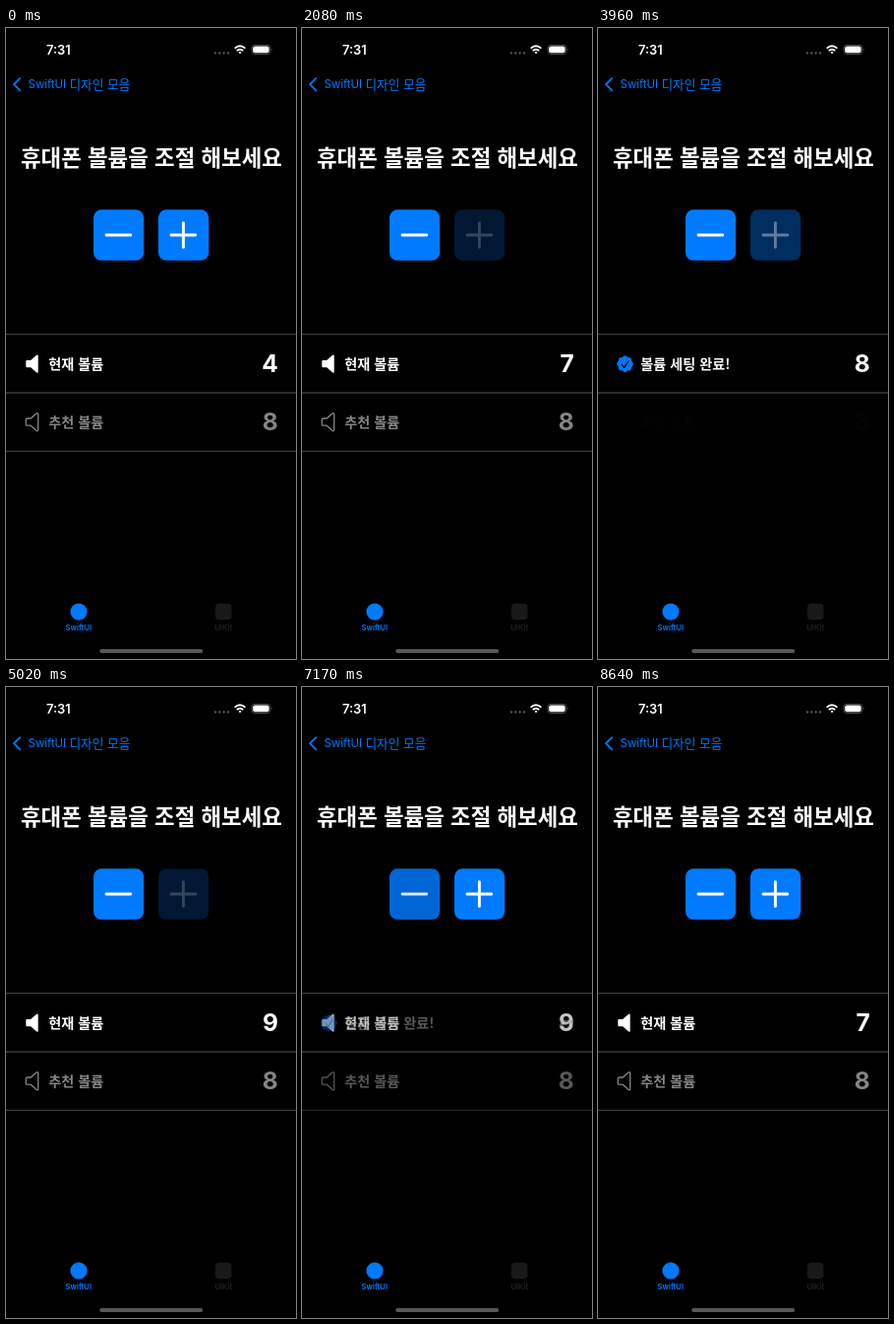
These frames come from a looping animation (295 by 640 pixels, 9.37 s). An HTML page:

```html
<!DOCTYPE html>
<html lang="ko">
<head>
<meta charset="utf-8">
<title>볼륨 조절</title>
<style>
  html, body { margin: 0; width: 100%; height: 100%; overflow: hidden; background: #000; }
  svg { display: block; width: 295px; height: 640px; }
  text { font-family: Inter, "Noto Sans CJK KR", "Noto Sans CJK JP", "Noto Sans CJK", sans-serif; fill: #fff; }
  .ko { font-family: "Noto Sans CJK KR", "Noto Sans CJK JP", "Noto Sans CJK", sans-serif; }
  .label { font-size: 14.15px; font-weight: 700; }
  .number { font-size: 24.5px; font-weight: 700; text-anchor: end; }
  .tab { font-size: 7.7px; font-weight: 600; text-anchor: middle; }
  .blue { fill: #007aff; }
  .gray { fill: #848484; }
  .line { stroke: #3b3b3b; stroke-width: 1.4; }
  .sign { fill: none; stroke: #fff; stroke-width: 2.9; stroke-linecap: round; }
</style>
</head>
<body>
<svg viewBox="0 0 295 640">
  <defs>
    <path id="speaker" d="M21.2 337h4l5.6-5q1.9-1.2 1.9.8v15.6q0 2-1.9.8l-5.6-5h-4q-.9 0-.9-.9v-5.4q0-.9.9-.9z"/>
  </defs>
  <rect width="295" height="640"/>

  <text x="41" y="26.6" font-size="12.9" font-weight="600">7:31</text>
  <path d="M213 25.4h13" stroke="#555" stroke-width="2.4" stroke-linecap="round" stroke-dasharray="0 4.3"/>
  <g fill="none" stroke="#fff" stroke-width="1.9">
    <path d="M232.6 20.6q5.4-4.8 10.8 0M234.8 23q3.2-2.7 6.4 0"/>
    <path d="M236.4 24.6q1.6-1.2 3.2 0l-1.6 1.8z" fill="#fff" stroke="none"/>
  </g>
  <rect x="250" y="17.4" width="18.8" height="9" rx="2.9" fill="none" stroke="#666" stroke-width=".8"/>
  <rect x="251.2" y="18.6" width="16.4" height="6.6" rx="1.9" fill="#fff"/>
  <path d="M269.9 20.5q1.3 1.4 0 2.8z" fill="#777"/>

  <path d="M14.2 51.2L8 57.2l6.2 6.1" fill="none" stroke="#007aff" stroke-width="1.8" stroke-linecap="round" stroke-linejoin="round"/>
  <text class="blue" x="22.6" y="61.3" font-size="11.4">SwiftUI</text>
  <text class="blue ko" x="64.4" y="61.5" font-size="12.7">디자인 모음</text>

  <text class="ko" x="15" y="140.4" font-size="22.38" font-weight="700">휴대폰 볼륨을 조절 해보세요</text>

  <g id="minus">
    <rect class="blue" x="89" y="184.3" width="51.2" height="51.5" rx="8"/>
    <path class="sign" d="M102 210h24.8"/>
  </g>
  <g id="plus">
    <rect class="blue" x="155" y="184.3" width="51.2" height="51.5" rx="8"/>
    <path class="sign" d="M168 210h24.8M180.4 197.6v24.8"/>
  </g>

  <path class="line" d="M0 310.6h295M0 370h295"/>
  <g id="current">
    <use href="#speaker" fill="#fff"/>
    <text class="label ko" x="43.3" y="345.5">현재 볼륨</text>
    <text class="number" id="value" x="276.8" y="349.3"></text>
  </g>
  <g id="done">
    <path id="seal" class="blue"/>
    <path d="M24.2 341.4l2.5 3 4.2-6.5" fill="none" stroke="#000" stroke-width="1.4" stroke-linecap="round" stroke-linejoin="round"/>
    <text class="label ko" x="43.3" y="345.5">볼륨 세팅 완료!</text>
    <text class="number" x="276.8" y="349.3">8</text>
  </g>
  <g id="advice">
    <use href="#speaker" y="59" fill="none" stroke="#848484" stroke-width="1.3"/>
    <text class="label ko gray" x="43.3" y="404.5">추천 볼륨</text>
    <text class="number gray" x="276.8" y="408.3">8</text>
    <path class="line" d="M0 429.4h295"/>
  </g>

  <circle class="blue" cx="74" cy="592" r="8.6"/>
  <text class="tab blue" x="73.8" y="611.2">SwiftUI</text>
  <rect x="213" y="583.8" width="16.4" height="16.4" rx="4" fill="#191919"/>
  <text class="tab" x="221.2" y="611.2" style="fill:#202020">UIKit</text>
  <rect x="95.2" y="630" width="105" height="4" rx="2" fill="#575757"/>
</svg>
<script>
  const LOOP = 9370, STEP = 109, HOLD = 80, UNDIM = 250, FADE = 350;
  const START_VOLUME = 4, GOAL = 8;
  const taps = [
    ...[760, 980, 1230, 2080, 3850, 5020].map(time => ({ time, button: "plus", change: 1 })),
    ...[5740, 6920, 7880].map(time => ({ time, button: "minus", change: -1 }))
  ];

  const el = id => document.getElementById(id);
  const progress = (age, length) => Math.max(0, Math.min(1, age / length));
  const easeOut = p => 1 - (1 - p) ** 2;
  const easeInOut = p => p * p * (3 - 2 * p);

  // The screen redraws in even steps counted from the latest tap.
  function snap(t) {
    const tap = taps.findLast(tap => tap.time <= t);
    return tap ? tap.time + Math.floor((t - tap.time) / STEP) * STEP : 0;
  }

  function drawButton(id, t) {
    const tap = taps.findLast(tap => tap.button === id && tap.time <= t);
    const lift = tap ? easeOut(progress(t - tap.time - HOLD, UNDIM)) : 1;
    for (const part of el(id).children) part.style.opacity = .2 + .8 * lift;
  }

  function drawRows(t) {
    const released = taps.filter(tap => tap.time + HOLD <= t);
    const last = released.at(-1) ?? { time: 0, change: 0 };
    const volume = released.reduce((sum, tap) => sum + tap.change, START_VOLUME);
    const before = volume - last.change;
    const fade = easeInOut(progress(t - last.time - HOLD, FADE));
    const done = volume === GOAL ? fade : before === GOAL ? 1 - fade : 0;

    el("value").textContent = volume === GOAL ? before : volume;
    el("current").style.opacity = el("advice").style.opacity = 1 - done;
    el("done").style.opacity = done;
  }

  function draw(t) {
    drawButton("minus", t);
    drawButton("plus", t);
    drawRows(t);
  }

  const rim = Array.from({ length: 64 }, (_, i) => {
    const a = i * Math.PI / 32, r = 7.9 + .55 * Math.cos(8 * a);
    return `${(27.5 + r * Math.cos(a)).toFixed(2)} ${(340.8 + r * Math.sin(a)).toFixed(2)}`;
  });
  el("seal").setAttribute("d", `M${rim.join("L")}Z`);

  const start = performance.now();
  function tick() {
    draw(snap((performance.now() - start) % LOOP));
    requestAnimationFrame(tick);
  }
  tick();
</script>
</body>
</html>
```
